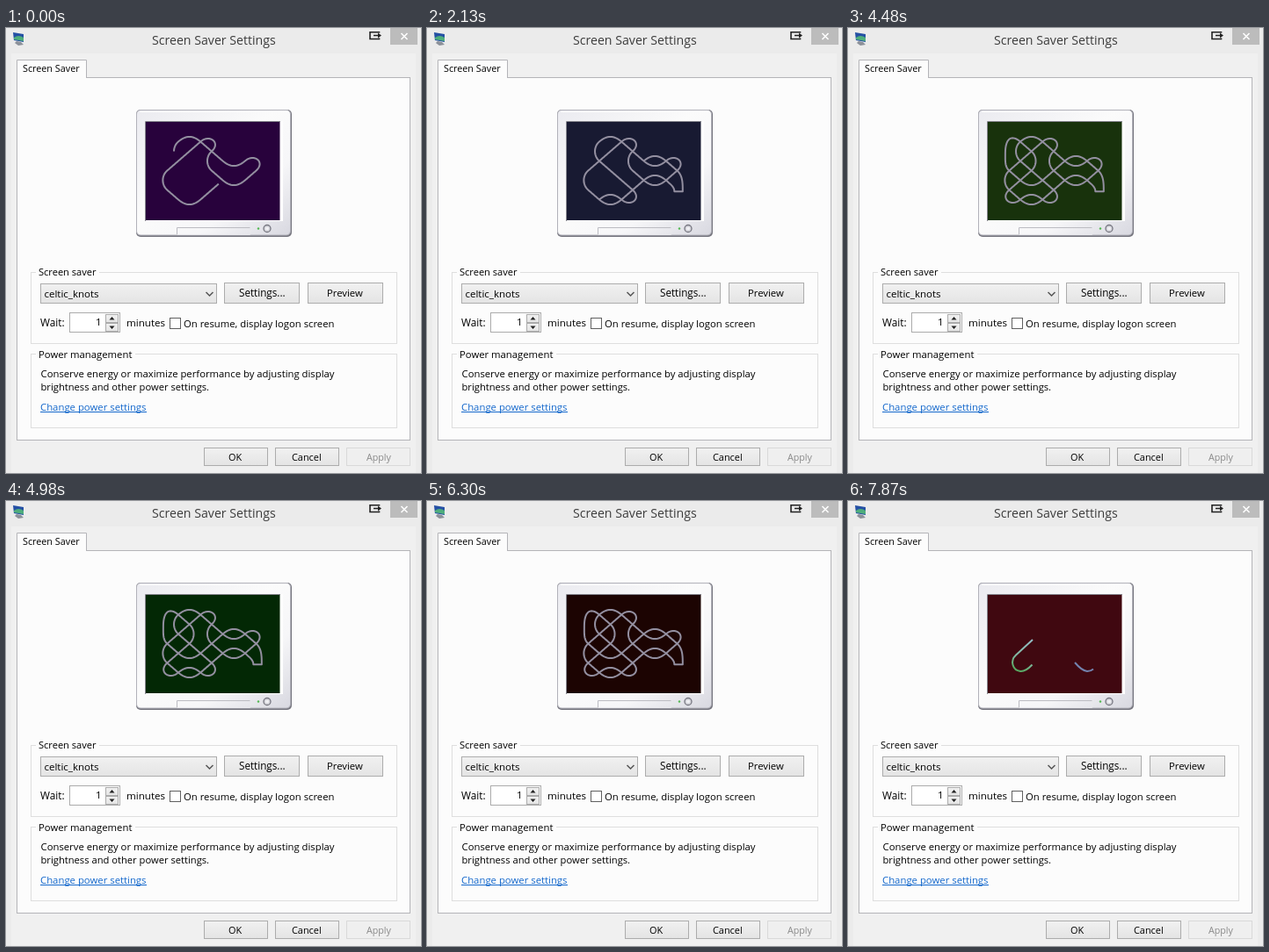
An HTML page that plays this animation: 472x507 px, repeating every 8 s.

```html
<!DOCTYPE html>
<html lang="en">
<head>
<meta charset="utf-8">
<title>Screen Saver Settings</title>
<style>
html, body { margin: 0; width: 100%; height: 100%; overflow: hidden; background: #ebebeb; }
svg { display: block; width: 472px; height: 507px; }
text { font: 11.3px "Open Sans", "Noto Sans", sans-serif; fill: #000; white-space: pre; }
.btn { fill: url(#btn); stroke: #acacac; }
.group { fill: none; stroke: #dedede; }
.knot { fill: none; stroke-width: 2; stroke-linejoin: round; }
</style>
</head>
<body>
<svg viewBox="0 0 472 507">
  <defs>
    <linearGradient id="btn" x2="0" y2="1"><stop stop-color="#f1f1f1"/><stop offset="1" stop-color="#e4e4e4"/></linearGradient>
    <linearGradient id="case" x2="1" y2="1"><stop stop-color="#ebebf0"/><stop offset=".45" stop-color="#fbfbfb"/><stop offset=".7" stop-color="#f6f6f8"/><stop offset="1" stop-color="#d8d8e0"/></linearGradient>
    <linearGradient id="hookInk" gradientUnits="userSpaceOnUse" x1="208" y1="158" x2="192" y2="192"><stop stop-color="#93bcc4"/><stop offset=".6" stop-color="#84b8a4"/><stop offset="1" stop-color="#58a862"/></linearGradient>
  </defs>

  <rect width="472" height="507" fill="#ebebeb"/>
  <rect x="6" y="29" width="460" height="478" fill="#f0f0f0"/>

  <!-- title bar -->
  <path d="M8 5l12 2v9l-11 -2z" fill="#2450a4"/>
  <path d="M9 11q5 -4 11 0v4l-11 -2z" fill="#4fae7c"/>
  <path d="M12 15l5 1 3 3 -6 1 -4 -3z" fill="#8b9099"/>
  <text x="166" y="19" style="font-size:14.15px;fill:#3c3c3c">Screen Saver Settings</text>
  <path d="M424.500 5.500V4.800H414V12.500H424.500V11.500M418 8.500H424" fill="none" stroke="#222" stroke-width="1.600"/>
  <path d="M423 5.500l4 3 -4 3z" fill="#222"/>
  <rect x="437" width="31" height="19" fill="#bcbcbc"/>
  <path d="M449.500 6l7 7m0 -7l-7 7" stroke="#fff" stroke-width="1.600"/>

  <!-- tab page -->
  <rect x="12.500" y="56.500" width="447" height="413" fill="#fcfcfc" stroke="#b4b4b8"/>
  <path d="M12.500 58V36.500H91.500V57" fill="#fcfcfc" stroke="#b4b4b8"/>
  <rect x="13" y="56" width="78" height="2" fill="#fcfcfc"/>
  <text x="19" y="50" style="font-size:10.8px">Screen Saver</text>

  <!-- monitor -->
  <rect x="148" y="93" width="177" height="145" rx="5" fill="#777780"/>
  <rect x="148.500" y="93.500" width="175" height="142.500" rx="4.500" fill="url(#case)" stroke="#b2b2ba"/>
  <path d="M152 95.500H320" stroke="#fff"/>
  <path d="M158 106H315V220H158z" fill="#fff"/>
  <path d="M158.500 220V106.500H312" fill="none" stroke="#85858d"/>
  <rect id="screen" x="159" y="107" width="152.500" height="112"/>
  <path d="M194.500 235V227.500H277.500" fill="none" stroke="#bcbcc2"/>
  <path d="M195 235.500H277.500V228" fill="none" stroke="#e8e8ec"/>
  <circle cx="287" cy="228.500" r="1.200" fill="#52b852"/>
  <circle cx="297" cy="228.500" r="4" fill="#d8d8de" stroke="#777780" stroke-width="1.300"/>
  <circle cx="297" cy="228.500" r="1.800" fill="#f2f2f5"/>
  <path id="knot" class="knot" stroke="#938fa0"/>
  <path id="hook" class="knot" stroke="url(#hookInk)" d="M210 158L191 175.500C184 182 187 193 196 194Q202 194.500 209.500 186.500"/>
  <path id="arc" class="knot" stroke="#7383ae" d="M258 184Q266 193.500 272 194Q276 194 279 191.500"/>

  <!-- screen saver group -->
  <rect class="group" x="28.500" y="278.500" width="416" height="81"/>
  <rect x="34" y="274" width="72" height="10" fill="#fcfcfc"/>
  <text x="37" y="282" style="font-size:11.1px">Screen saver</text>
  <rect class="btn" x="39.500" y="291.500" width="200" height="22"/>
  <text x="43.500" y="307" style="font-size:11.5px">celtic_knots</text>
  <path d="M227.500 301l4 4 4 -4" fill="none" stroke="#555" stroke-width="1.500"/>
  <rect class="btn" x="248.500" y="290.500" width="85" height="23"/>
  <text x="265" y="306" style="font-size:11.7px">Settings...</text>
  <rect class="btn" x="343.500" y="290.500" width="85" height="23"/>
  <text x="365" y="306">Preview</text>
  <text x="39" y="340" style="font-size:11.8px">Wait:</text>
  <rect x="72.500" y="324.500" width="57" height="22" fill="#fff" stroke="#ababab"/>
  <text x="102" y="339" style="font-size:11.6px">1</text>
  <rect class="btn" x="113.500" y="326.500" width="14" height="9"/>
  <rect class="btn" x="113.500" y="336.500" width="14" height="9"/>
  <path d="M117.500 332.500l3 -3.500 3 3.500zM117.500 339.500l3 3.500 3 -3.500z" fill="#222"/>
  <text x="137" y="340" style="font-size:11.6px">minutes</text>
  <rect x="186.500" y="330.500" width="12" height="12" fill="#fff" stroke="#606060"/>
  <text x="202" y="341">On resume, display logon screen</text>

  <!-- power group -->
  <rect class="group" x="28.500" y="371.500" width="416" height="84"/>
  <rect x="34" y="367" width="113" height="10" fill="#fcfcfc"/>
  <text x="37" y="376">Power management</text>
  <text x="39.500" y="398">Conserve energy or maximize performance by adjusting display</text>
  <text x="39.500" y="413" style="font-size:11.2px">brightness and other power settings.</text>
  <text x="39" y="436" style="font-size:11.35px;fill:#1468cc">Change power settings</text>
  <path d="M39 437.500H160" stroke="#1468cc"/>

  <!-- dialog buttons -->
  <rect class="btn" x="225.500" y="478.500" width="72" height="20"/>
  <text x="253" y="493" style="font-size:10.9px">OK</text>
  <rect class="btn" x="306.500" y="478.500" width="72" height="20"/>
  <text x="325" y="493" style="font-size:10.9px">Cancel</text>
  <rect x="387.500" y="478.500" width="72" height="20" fill="#efefef" stroke="#d9d9d9"/>
  <text x="410" y="493" style="font-size:10.7px;fill:#8a8a8a">Apply</text>
</svg>
<script>
const LOOP = 8000;
const $ = id => document.getElementById(id);

// Steps at which both ends of the strand grow by about one cell.
const ticks = [0, 250, 500, 780, 1060, 1340, 1610, 1860, 2130, 2380, 2630,
  2880, 3130, 3410, 3690, 3960, 4480, 4980, 5750, 6300, 6850, 7370, 7620, 7870];
const CLOSED = 15, RESTART = 7370;

// Screen colours: time, r, g, b
const tints = [[0, 40, 2, 60], [2130, 24, 26, 50], [3960, 46, 60, 20], [4980, 3, 40, 5],
  [5750, 3, 17, 2], [6300, 28, 4, 2], [6850, 50, 6, 11], [7870, 64, 8, 16]];

// The strand walks diagonally from crossing to crossing:
// F straight, L/R bend off a wall, U/V round a corner to the left/right,
// C and E the top left corner where the ends meet, T the flat tail.
const WALK = "CFRFFURUFFFRRFFLVFRFRUFFFLFLFFRTFLFFRFE";
const SUB = 16;
const pts = [], dist = [], marks = [0];

const left = ([x, y]) => [y, -x];
const right = ([x, y]) => [-y, x];
const add = (p, d, k = 1) => [p[0] + d[0] * k, p[1] + d[1] * k];
const mix = (a, b, u) => a + (b - a) * u;

function addPoint(col, row) {
  const p = [183.3 + 12.65 * col, 129.5 + 11 * row];
  const n = pts.length, last = pts[n - 1];
  dist.push(n ? dist[n - 1] + Math.hypot(p[0] - last[0], p[1] - last[1]) : 0);
  pts.push(p);
}

function addCurve(a, b, c, d) {
  for (let k = 1; k <= SUB; k++) {
    const u = k / SUB, v = 1 - u;
    const at = i => v * v * v * a[i] + 3 * v * v * u * b[i] + 3 * v * u * u * c[i] + u * u * u * d[i];
    addPoint(at(0), at(1));
  }
}

function walk() {
  const seam = [-.35, 1.2];
  let pos = seam, dir = [1, 1];
  addPoint(...seam);
  for (const move of WALK) {
    const turn = "LU".includes(move) ? left : right;
    let to = add(pos, dir), out = dir, reach = 1 / 3;
    if ("LR".includes(move)) {
      out = turn(dir);
      to = add(to, out);
      reach = out[0] === dir[0] ? .67 : .52;
    } else if ("UV".includes(move)) {
      to = add(pos, turn(dir));
      out = [-dir[0], -dir[1]];
      reach = .85;
    }
    if (move === "C") {
      to = [1, 0];
      addCurve(pos, [-.35, -.5], [.3, -.7], to);
    } else if (move === "E") {
      addCurve(pos, [-.4, 2.6], [-.35, 2], seam);
    } else if (move === "T") {
      const a = [7.75, 5.15], b = [8.5, 5.15];
      to = [8, 3];
      out = [-1, -1];
      addCurve(pos, [7.4, 4.4], [7.75, 4.7], a);
      addCurve(a, a, b, b);
      addCurve(b, [8.5, 4.3], [8.5, 3.5], to);
    } else {
      addCurve(pos, add(pos, dir, reach), add(to, out, -reach), to);
    }
    pos = to;
    dir = out;
    marks.push(pts.length - 1);
  }
}
walk();

// Length along the strand after a number of moves
function along(moves) {
  const i = Math.floor(moves);
  const a = dist[marks[i]], b = dist[marks[Math.min(i + 1, WALK.length)]];
  return mix(a, b, moves - i);
}

// Where an end stands after a number of steps: start, halfway at step 8, closed
function endAt(step, from, mid, to) {
  return step <= 8
    ? mix(along(from), along(mid), step / 8)
    : mix(along(mid), along(to), (step - 8) / (CLOSED - 8));
}

function strandPath(step) {
  const lo = endAt(step, 11.5, 6, 0);
  const hi = endAt(step, 29.65, 34, WALK.length);
  const shown = pts.filter((p, i) => dist[i] >= lo - .01 && dist[i] <= hi + .01);
  return "M" + shown.map(p => p[0].toFixed(2) + " " + p[1].toFixed(2)).join("L");
}

function tintAt(t) {
  let i = 0;
  while (i < tints.length - 2 && tints[i + 1][0] <= t) i++;
  const a = tints[i], b = tints[i + 1];
  const u = Math.min(1, (t - a[0]) / (b[0] - a[0]));
  return `rgb(${[1, 2, 3].map(c => Math.round(mix(a[c], b[c], u)))})`;
}

// Show only the part of a path between two fractions of its length.
function reveal(el, from, to) {
  const len = el.getTotalLength();
  el.style.display = to > from ? "" : "none";
  el.style.strokeDasharray = `0 ${len * from} ${len * (to - from)} ${len * 2}`;
}

let shownTick = -1;

function draw(t) {
  let tick = 0;
  while (tick < ticks.length - 1 && ticks[tick + 1] <= t) tick++;
  if (tick === shownTick) return;
  shownTick = tick;
  const at = ticks[tick];
  $("screen").setAttribute("fill", tintAt(at));
  $("knot").style.display = at < RESTART ? "" : "none";
  $("knot").setAttribute("d", strandPath(Math.min(tick, CLOSED)));
  const fresh = Math.max(0, tick - ticks.indexOf(RESTART));
  reveal($("hook"), .5 - fresh / 4, .5 + fresh / 4);
  reveal($("arc"), 0, [0, .8, 1][fresh]);
}

const start = performance.now();
function loop() {
  draw((performance.now() - start) % LOOP);
  requestAnimationFrame(loop);
}
loop();
</script>
</body>
</html>
```
